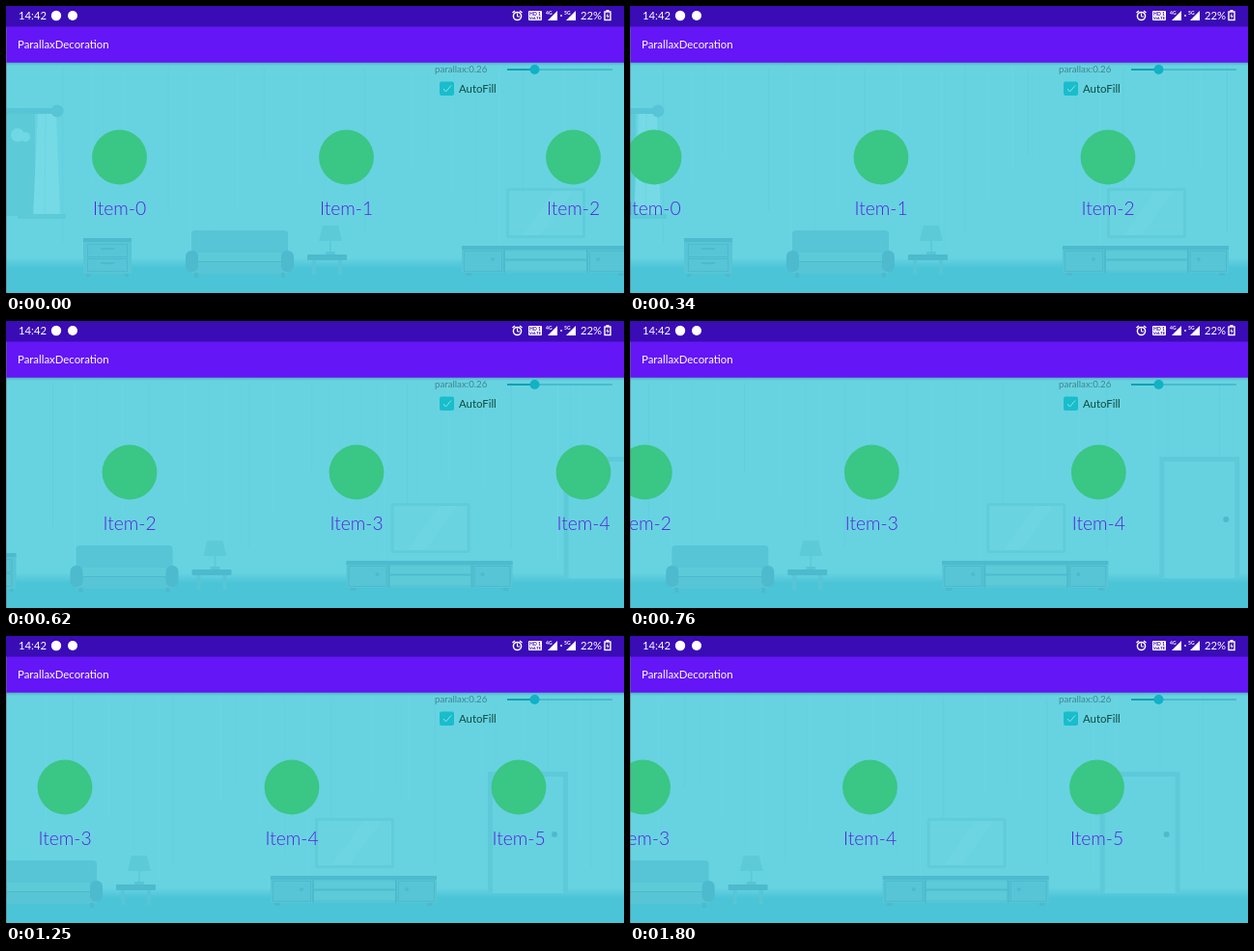
Recreate the animation shown at these times as an HTML page with a canvas. Size 640 by 298 pixels, loop 1.93 s.

```html
<!DOCTYPE html>
<html lang="en">
<head>
<meta charset="utf-8">
<title>ParallaxDecoration</title>
<style>
html, body { margin: 0; width: 640px; height: 298px; overflow: hidden; background: #67d3e1; }
canvas { display: block; }
</style>
</head>
<body>
<canvas id="stage" width="640" height="298"></canvas>
<script>
const g = document.getElementById('stage').getContext('2d');
const LOOP = 1930, STEP = 70, PITCH = 235, PARALLAX = 0.26;
const DARK = '#57c5d5', MID = '#5dcad8', EDGE = '#4dbacd', PALE = '#70d8e5';

// Scroll distance over time: a slow drag, then a fling that dies away.
const keys = [[0, 0], [340, 92.5], [620, 459.5], [970, 689.5], [1250, 761.5],
              [1530, 805.5], [1800, 809], [1930, 809]];
const rate = keys.slice(1).map(([t, s], i) => (s - keys[i][1]) / (t - keys[i][0]));
const slope = keys.map((_, i) => {
  const a = rate[i - 1] || 0, b = rate[i] || 0;
  return a * b > 0 ? 2 * a * b / (a + b) : 0;
});

function scrollAt(t) {
  const i = Math.max(0, keys.findIndex(k => k[0] > t) - 1);
  const [t0, s0] = keys[i], [t1, s1] = keys[i + 1];
  const h = t1 - t0, u = (t - t0) / h, v = 1 - u;
  return s0 * (1 + 2 * u) * v * v + s1 * u * u * (3 - 2 * u)
    + h * u * v * (v * slope[i] - u * slope[i + 1]);
}

// The picture advances in even steps, with two longer holds.
function hold(t) {
  if (t < 340) return Math.min(210, Math.floor(t / STEP) * STEP);
  if (t < 1600) return Math.min(1530, 340 + Math.floor((t - 340) / STEP) * STEP);
  if (t < 1660) return 1530;
  return Math.min(1800, 1660 + Math.floor((t - 1660) / STEP) * STEP);
}

function box(x, y, w, h, fill, r = 0) {
  g.fillStyle = fill;
  g.beginPath();
  g.roundRect(x, y, w, h, r);
  g.fill();
}

function frame(x, y, w, h, color, width = 1) {
  g.strokeStyle = color;
  g.lineWidth = width;
  g.strokeRect(x, y, w, h);
}

function disc(x, y, r, fill) {
  g.fillStyle = fill;
  g.beginPath();
  g.arc(x, y, r, 0, 7);
  g.fill();
}

function poly(fill, ...p) {
  g.fillStyle = fill;
  g.beginPath();
  for (let i = 0; i < p.length; i += 2) g.lineTo(p[i], p[i + 1]);
  g.fill();
}

function line(color, width, ...p) {
  g.strokeStyle = color;
  g.lineWidth = width;
  g.beginPath();
  for (let i = 0; i < p.length; i += 2) g.lineTo(p[i], p[i + 1]);
  g.stroke();
}

// A gradient running from y0 to y1.
function fade(y0, y1, from, to) {
  const f = g.createLinearGradient(0, y0, 0, y1);
  f.addColorStop(0, from);
  f.addColorStop(1, to);
  return f;
}

function text(str, x, y, size, color, align = 'left', weight = 400) {
  g.font = `${weight} ${size}px Lato, "Open Sans", sans-serif`;
  g.textAlign = align;
  g.fillStyle = color;
  g.fillText(str, x, y);
}

function curtains() {
  box(0, 112, 30, 106, MID);
  disc(12, 134, 7, PALE);
  disc(20, 136, 5, PALE);
  poly('#75dae6', 33, 112, 52, 112, 56, 219, 28, 219);
  line('#6dd5e2', 1, 41, 112, 40, 219);
  box(12, 216, 50, 5, MID);
  box(0, 106, 54, 6, DARK);
  disc(53, 109, 6.5, DARK);
}

function cabinet() {
  box(80, 241, 50, 37, DARK, 1);
  box(80, 241, 50, 4, EDGE);
  for (const y of [247, 262]) {
    frame(84.5, y + .5, 41, 13, EDGE);
    box(98, y + 4, 14, 2, EDGE);
  }
  box(83, 278, 4, 3, EDGE);
  box(123, 278, 4, 3, EDGE);
}

function sofa() {
  box(192, 233, 100, 34, DARK, 4);
  box(196, 256, 92, 9, MID, 3);
  box(192, 265, 100, 13, DARK, 2);
  line(EDGE, 1, 196, 265.5, 288, 265.5);
  box(186, 254, 13, 22, EDGE, 6);
  box(285, 254, 13, 22, EDGE, 6);
  box(195, 277, 4, 5, EDGE);
  box(285, 277, 4, 5, EDGE);
}

function lamp() {
  poly(MID, 328, 228, 344, 228, 348, 244, 324, 244);
  box(335, 244, 2, 13, MID);
  box(331, 255, 10, 3, DARK, 1);
  box(312, 258, 41, 6, EDGE, 1);
  box(317, 264, 4, 15, DARK);
  box(344, 264, 4, 15, DARK);
}

function television() {
  box(518, 189, 82, 52, '#60ccda', 2);
  box(521, 192, 76, 46, '#69d3e0');
  poly('#6dd5e2', 535, 238, 568, 192, 587, 192, 554, 238);
  box(472, 249, 172, 28, DARK, 1);
  box(472, 249, 172, 4, EDGE);
  frame(474.5, 254.5, 39, 21, EDGE);
  frame(604.5, 254.5, 37, 21, EDGE);
  box(517, 255, 84, 7, MID);
  box(517, 265, 84, 9, MID);
  line(EDGE, 2, 516, 253, 516, 277);
  line(EDGE, 2, 602, 253, 602, 277);
  line(EDGE, 1.5, 516, 263.5, 602, 263.5);
  disc(504, 263, 2, EDGE);
  disc(613, 263, 2, EDGE);
  box(476, 277, 6, 3, EDGE);
  box(634, 277, 6, 3, EDGE);
}

function door() {
  box(697, 141, 83, 126, '#5ecad9');
  box(702, 146, 73, 121, '#66d2e0');
  disc(766, 206, 3, EDGE);
}

function room() {
  for (let i = 0; i < 50; i++) {
    const x = i * 18 + 7 * Math.sin(i * 5);
    g.globalAlpha = .14 + .1 * Math.sin(i * 3);
    line(i % 3 ? '#7bddea' : '#52bfd0', 1, x, 64, x, 205 + 50 * Math.sin(i * 7));
  }
  g.globalAlpha = 1;
  box(0, 262, 1000, 36, fade(262, 272, '#65d2e0', '#4bc4d8'));
  curtains();
  cabinet();
  sofa();
  lamp();
  television();
  door();
}

function statusBar() {
  box(0, 0, 640, 21.5, '#3a0cb5');
  text('14:42', 13, 14, 11.3, '#fff');
  disc(52, 10, 5.2, '#fff');
  disc(69, 10, 5, '#fff');

  disc(529.5, 10.5, 4.8, '#fff');
  disc(529.5, 10.5, 3.3, '#3a0cb5');
  line('#fff', 1, 529.5, 7.5, 529.5, 11, 532, 11);
  line('#fff', 1.5, 524.5, 7, 527, 5);
  line('#fff', 1.5, 532, 5, 534.5, 7);

  box(541, 5, 14, 10, '#fff', 1);
  text('HD 1', 548, 9.5, 5, '#3a0cb5', 'center', 700);
  text('VoLTE', 548, 14, 4.5, '#3a0cb5', 'center', 700);
  for (const [x, label] of [[559, '4G'], [578, '5G']]) {
    text(label, x, 9, 5, '#fff', 'left', 700);
    poly('#fff', x + 2, 15, x + 12, 5, x + 12, 15);
  }
  box(574, 9, 2, 2, '#b9a8ea');
  text('22%', 595, 14, 11.3, '#fff');
  frame(620, 6, 6, 8.5, '#fff', 1.4);
  box(621.5, 4, 3, 2, '#fff');
  poly('#fff', 623.5, 7, 621.5, 11, 623, 11, 622.5, 13.5, 624.7, 10, 623.2, 10);
}

function controls() {
  text('parallax:0.26', 444, 69, 9.7, '#41858f');
  line('#2aa5b7', 1.2, 547, 66, 628, 66);
  line('#159fb3', 2, 519, 66, 547, 66);
  disc(547.5, 66, 5, '#12b1c5');
  box(449, 78.5, 15, 14.5, '#19bdcb', 2);
  line('#8ee0e6', 1, 453, 86, 455.5, 89, 461, 82.5);
  text('AutoFill', 469, 90, 11.4, '#0c4c42');
}

function draw(s) {
  box(0, 58, 640, 240, '#67d3e1');
  g.save();
  g.translate(-s * PARALLAX, 0);
  room();
  g.restore();

  for (let i = 0; i < 6; i++) {
    const x = 117.5 + i * PITCH - s;
    disc(x, 157, 28.4, '#3ac685');
    text('Item-' + i, x, 217, 19.3, '#5521dc', 'center', 300);
  }
  controls();

  box(0, 58, 640, 4, fade(58, 62, 'rgba(20,70,100,.3)', 'rgba(20,70,100,0)'));
  box(0, 21, 640, 37.7, '#6416f6');
  text('ParallaxDecoration', 12, 44, 11.4, '#fff');
  box(0, 21, 1, 277, 'rgba(100,120,120,.5)');
  statusBar();
}

function tick() {
  draw(scrollAt(hold(performance.now() % LOOP)));
  requestAnimationFrame(tick);
}
tick();
</script>
</body>
</html>
```
